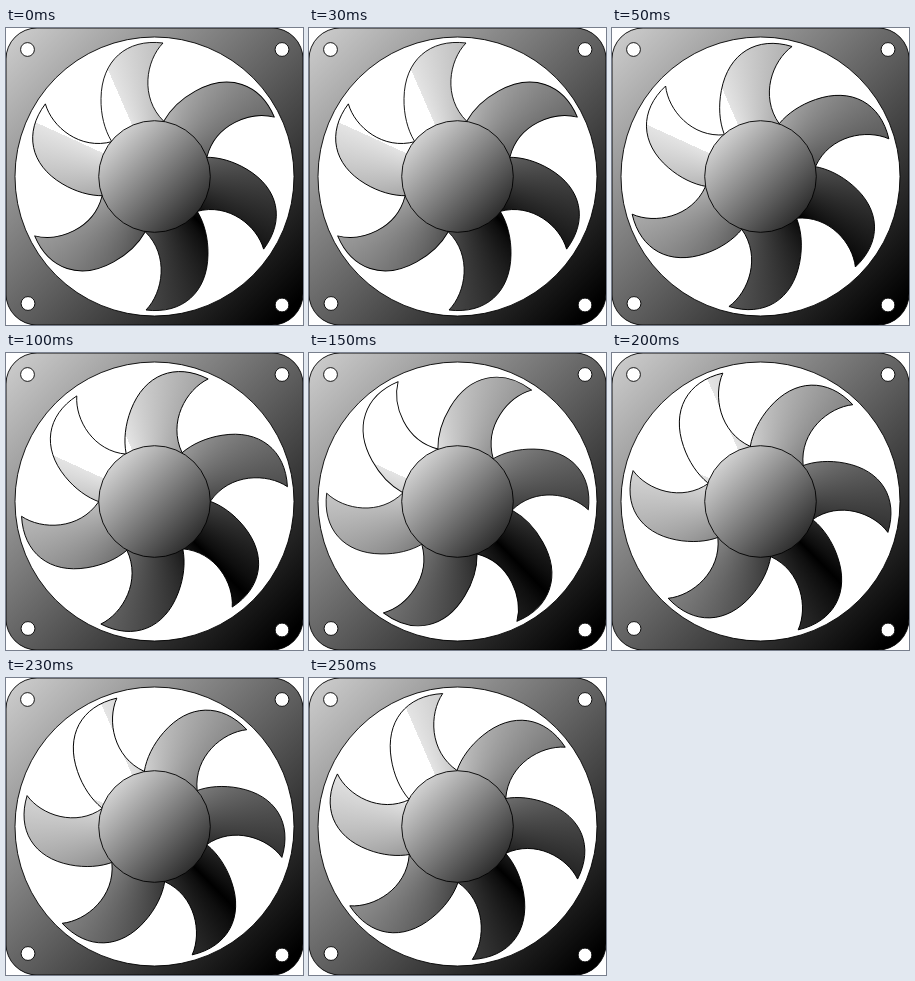
An HTML page that plays this animation: 297 by 297 pixels, repeating every 0.3 s.

```html
<!DOCTYPE html>
<html lang="en">
<head>
<meta charset="utf-8">
<title>Cooling fan</title>
<style>
  @property --turn { syntax: "<angle>"; inherits: false; initial-value: 0deg; }
  html, body { margin: 0; width: 100%; height: 100%; overflow: hidden; background: #fff; }
  .fan { position: relative; width: 297px; height: 297px; }
  /* Fixed shading, seen through the blade-shaped openings of the turning disc */
  .shade {
    position: absolute; left: 9px; top: 9px; width: 279px; height: 279px;
    border-radius: 50%;
    background: conic-gradient(from -44.5deg,
      #fff 21deg, #e4e4e4 21deg, #0e0e0e 173deg, #000 180deg,
      #0e0e0e 187deg, #e4e4e4 339deg, #fff 339deg);
  }
  svg { position: absolute; left: 0; top: 0; display: block; }
  .line { fill: none; stroke: #000; stroke-width: .9; stroke-linejoin: round; }
  /* Animating the angle itself keeps the thin lines sharp at every step */
  .rotor {
    transform-origin: 0 0; transform: rotate(var(--turn));
    animation: spin 300ms steps(6, end) -150ms infinite;
  }
  @keyframes spin { from { --turn: -30deg; } to { --turn: 30deg; } }
</style>
</head>
<body>
<div class="fan">
  <div class="shade"></div>
  <svg width="297" height="297" viewBox="0 0 297 297">
    <defs>
      <linearGradient id="metal" x1="0" y1="0" x2="1" y2="1">
        <stop offset="0" stop-color="#d0d0d0"/>
        <stop offset=".95" stop-color="#000"/>
      </linearGradient>
      <linearGradient id="cap" x1="0" y1="0" x2="1" y2="1">
        <stop offset="0" stop-color="#f4f4f4"/>
        <stop offset="1" stop-color="#0c0c0c"/>
      </linearGradient>
      <path id="blade" d="M0 0L-43.2 -35.6C-50 -47 -53.8 -62 -53.5 -78C-53 -116 -28 -138 8.5 -133.5C-8.5 -116 -15 -79 9.3 -55.2Z"/>
      <!-- One opposite pair is slightly shorter -->
      <g id="blades">
        <use href="#blade"/>
        <use href="#blade" transform="rotate(60)"/>
        <use href="#blade" transform="rotate(120) scale(.98)"/>
        <use href="#blade" transform="rotate(180)"/>
        <use href="#blade" transform="rotate(240)"/>
        <use href="#blade" transform="rotate(300) scale(.98)"/>
      </g>
      <mask id="gaps" maskUnits="userSpaceOnUse" x="-150" y="-150" width="300" height="300">
        <circle r="145" fill="#fff"/>
        <use href="#blades" fill="#000"/>
      </mask>
    </defs>

    <g transform="translate(148.5 148.5)">
      <g class="rotor">
        <circle r="141" fill="#fff" mask="url(#gaps)"/>
        <use href="#blades" class="line"/>
      </g>
    </g>

    <path fill="url(#metal)" stroke="#000" stroke-width=".9" fill-rule="evenodd"
      d="M31 0H266A31 31 0 0 1 297 31V266A31 31 0 0 1 266 297H31A31 31 0 0 1 0 266V31A31 31 0 0 1 31 0Z
         M9 148.5A139.5 139.5 0 0 0 288 148.5A139.5 139.5 0 0 0 9 148.5Z"/>
    <g fill="#fff" stroke="#000" stroke-width=".9">
      <circle cx="21.5" cy="21.5" r="6.9"/>
      <circle cx="276" cy="21.5" r="6.9"/>
      <circle cx="22" cy="275.5" r="6.9"/>
      <circle cx="276" cy="277" r="6.9"/>
    </g>
    <circle cx="148.5" cy="148.5" r="55.8" fill="url(#cap)" stroke="#000" stroke-width=".9"/>
  </svg>
</div>
</body>
</html>
```
